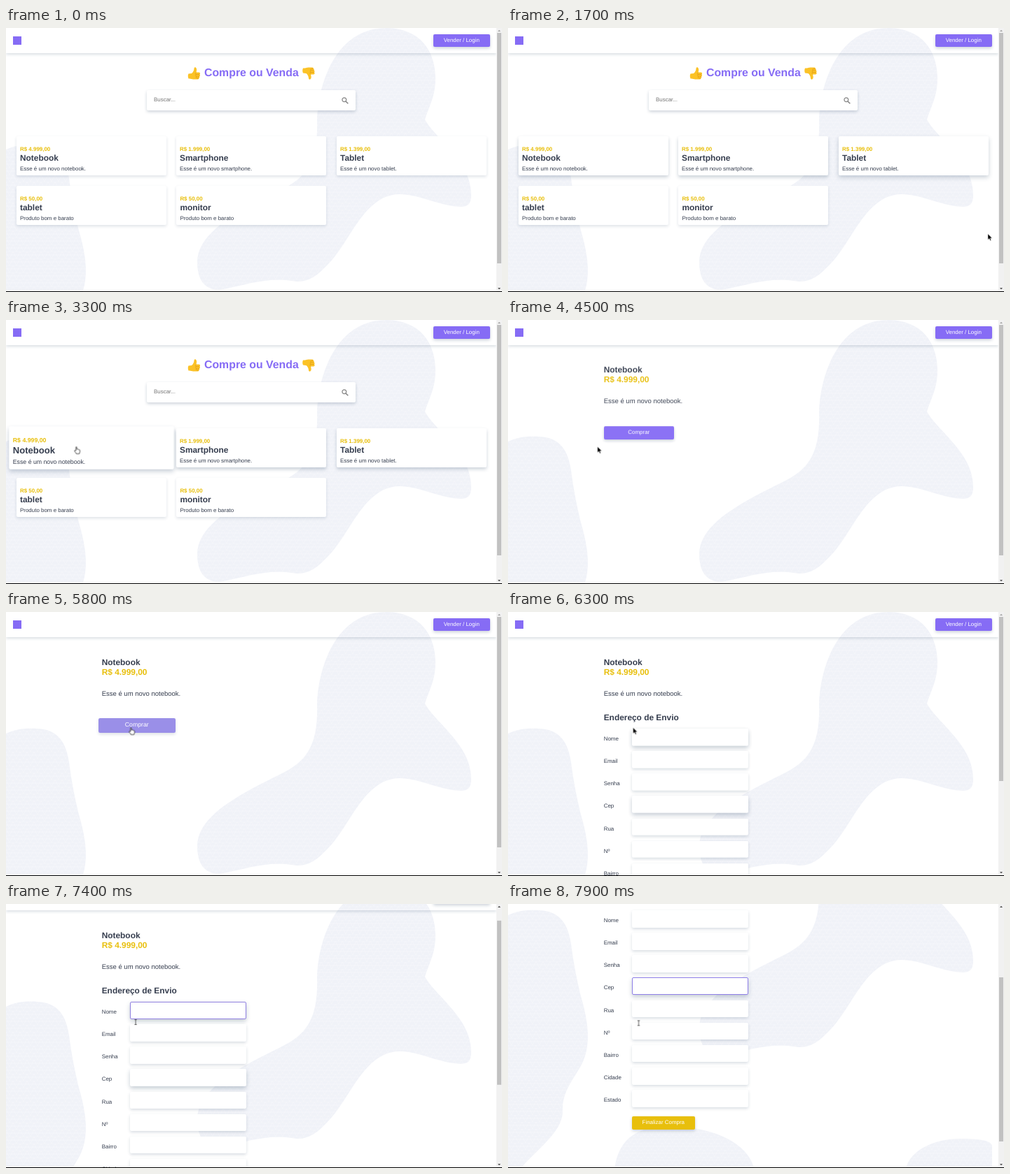
Write an HTML page that moves like this. It is 708x378 px and loops after 8 s.

```html
<!DOCTYPE html>
<html lang="pt-BR">
<head>
<meta charset="utf-8">
<title>Loja</title>
<style>
  :root { --purple: #866cf5; --gold: #e8bf0c; --ink: #353d4e; }
  html, body { margin: 0; width: 100%; height: 100%; overflow: hidden; background: #fff; }
  body { font: 7.95px/0 "Liberation Sans", Arial, sans-serif; color: var(--ink); text-rendering: geometricPrecision; }
  div, span, svg { position: absolute; }
  span { white-space: nowrap; }
  .a { animation-duration: 8s; animation-iteration-count: infinite; }
  #stage { width: 708px; height: 378px; overflow: hidden; background: #000; }
  #view { width: 708px; height: 377px; overflow: hidden; background: #fff; }
  #page { width: 700px; height: 600px; animation-name: scroll; }
  .layer { left: 0; top: 0; width: 700px; height: 600px; }

  #header { width: 700px; height: 36px; box-shadow: 0 2px 4px rgba(30,60,90,.16); }
  #logo { left: 10px; top: 12px; width: 12px; height: 12px; background: var(--purple); }
  .btn { border-radius: 2px; background: var(--purple); color: #fff; text-align: center; box-shadow: 0 2px 4px rgba(30,60,90,.22); }
  .btn span { left: 0; right: 0; }
  .big { font-size: 11.9px; font-weight: bold; }
  .price { font-weight: bold; color: var(--gold); }

  #title { left: 283px; top: 65px; font-size: 15.85px; font-weight: bold; color: var(--purple); }
  #search { left: 201px; top: 89px; width: 298px; height: 28.5px; border-radius: 2px; background: #fff; box-shadow: 0 2px 4px rgba(30,60,90,.22); }
  .card { width: 214px; height: 56px; border-radius: 2px; background: #fff; box-shadow: 0 2px 4px rgba(30,60,90,.14); }
  .card span { left: 5px; }

  #home { animation-name: leave; }
  #product { animation-name: enter; }
  #form { animation-name: form; }
  #buy { left: 136.5px; top: 153px; width: 99.5px; height: 18.5px; animation-name: buy; }
  #product > span, #form > span { left: 136.7px; }
  .field { left: 176.5px; width: 166.5px; height: 24.5px; border-radius: 2px; background: #fff; border: 1px solid transparent;
    box-sizing: border-box; box-shadow: 0 2px 4px rgba(30,60,90,.17); }
  #done { left: 176.5px; top: 462px; width: 90.5px; height: 18.5px; background: var(--gold); }

  #bar { left: 700px; width: 8px; height: 377px; background: #f1f1f1; }
  #thumb { left: 1.3px; top: 7px; width: 5.7px; height: 330px; background: #c1c1c1; animation-name: size, tint, slide; }
  #up { animation-name: up; animation-timing-function: step-end; }
  #cursor { left: 0; top: 0; animation-name: path; animation-timing-function: linear; }
  #cursor svg { left: -10px; top: -10px; animation-timing-function: step-end; }
  #arrow { animation-name: arrow; }
  #hand { animation-name: hand; }
  #beam { animation-name: beam; }

  @keyframes leave { 0%, 50% { opacity: 1; transform: none; } 53.5%, 100% { opacity: 0; transform: translateY(20px); } }
  @keyframes enter { 0%, 53.5% { opacity: 0; transform: translateY(-20px); } 57.25%, 100% { opacity: 1; transform: none; } }
  @keyframes form { 0%, 75.44% { opacity: 0; transform: translateY(-20px); } 79.19%, 100% { opacity: 1; transform: none; } }
  @keyframes buy {
    0%, 60.75% { background: var(--purple); transform: none; opacity: 1; }
    64%, 71.69% { background: #6655dd; transform: scale(1.1); opacity: 1; }
    75.44%, 100% { background: #6655dd; transform: scale(1.1); opacity: 0; }
  }
  @keyframes hover0 {
    0%, 35% { transform: none; }
    38.75%, 100% { transform: scale(1.1); box-shadow: 0 3px 6px rgba(30,60,90,.24); }
  }
  @keyframes hover1 {
    0%, 31.1% { transform: none; }
    34.75%, 35% { transform: scale(1.1); box-shadow: 0 3px 6px rgba(30,60,90,.24); }
    38.75%, 100% { transform: none; }
  }
  @keyframes hover2 {
    0%, 26.5% { transform: none; }
    30.25%, 31.1% { transform: scale(1.1); box-shadow: 0 3px 6px rgba(30,60,90,.24); }
    34.9%, 100% { transform: none; }
  }
  @keyframes focus0 {
    0%, 84.6% { border-color: transparent; }
    88.3%, 95% { border-color: #8f7fe0; box-shadow: 0 3px 6px rgba(30,60,90,.26); }
    98.5%, 100% { border-color: transparent; }
  }
  @keyframes focus3 {
    0%, 95% { border-color: transparent; }
    98.5%, 100% { border-color: #8f7fe8; box-shadow: 0 3px 6px rgba(30,60,90,.26); }
  }
  @keyframes scroll {
    0%, 90% { transform: none; animation-timing-function: ease-in-out; }
    98.75%, 100% { transform: translateY(-158px); }
  }
  @keyframes slide {
    0%, 90% { transform: none; animation-timing-function: ease-in-out; }
    98.75%, 100% { transform: translateY(98px); }
  }
  @keyframes size { 0%, 75.44% { height: 330px; } 75.45%, 100% { height: 235px; } }
  @keyframes tint {
    0%, 8.69% { background: #c1c1c1; }
    8.7%, 11.1% { background: #a8a8a8; }
    11.2%, 100% { background: #c1c1c1; }
  }
  @keyframes up { 0% { fill: #a3a3a3; } 90.2%, 100% { fill: #505050; } }
  @keyframes path {
    0%, 8.7% { transform: translate(704px, 310px); }
    11.2%, 20.6% { transform: translate(689px, 294px); }
    21.2% { transform: translate(685.5px, 295.5px); }
    25% { transform: translate(648px, 245px); }
    27.5% { transform: translate(600px, 195px); }
    31.25% { transform: translate(452px, 188px); }
    35% { transform: translate(230px, 187px); }
    41.2%, 42.75% { transform: translate(100.5px, 181.5px); }
    46.25%, 51% { transform: translate(110px, 189.5px); }
    56.2% { transform: translate(127px, 181.5px); }
    61%, 83.5% { transform: translate(178.5px, 165.5px); }
    85%, 90% { transform: translate(184.5px, 168.5px); }
    98.75%, 100% { transform: translate(186.5px, 170.5px); }
  }
  @keyframes arrow { 0% { opacity: 0; } 8.7% { opacity: 1; } 26.5% { opacity: 0; } 53.5% { opacity: 1; } 60.7% { opacity: 0; } 75.4% { opacity: 1; } 84.6%, 100% { opacity: 0; } }
  @keyframes hand { 0% { opacity: 0; } 26.5% { opacity: 1; } 53.5% { opacity: 0; } 60.7% { opacity: 1; } 75.4%, 100% { opacity: 0; } }
  @keyframes beam { 0% { opacity: 0; } 84.6%, 100% { opacity: 1; } }
</style>
</head>
<body>
<div id="stage">
  <div id="view">
    <div id="page" class="a">
      <svg width="700" height="600">
        <defs>
          <pattern id="mesh" width="10" height="10" patternUnits="userSpaceOnUse">
            <rect width="10" height="10" fill="#f0f2f8"/>
            <path d="M0 0L5 10L10 0M0 0H10M0 5H10" fill="none" stroke="#fff" stroke-width=".6" opacity=".4"/>
          </pattern>
        </defs>
        <g fill="url(#mesh)">
          <path d="M543 0C590 0 613 32 613 72C613 98 604 112 598 131C612 158 664 190 664 238C664 252 660 256 648 256C615 254 590 238 562 238C510 238 490 310 458 340C445 354 432 364 415 363C370 356 345 368 310 374C285 378 273 362 273 335C273 290 340 258 392 232C430 214 446 190 444 130C446 80 470 0 543 0Z"/>
          <path d="M0 174C15 167 30 166 45 167C75 168 86 188 90 215C94 245 98 265 104 290C110 310 114 330 114 347C114 370 108 385 98 400C85 420 77 435 78 455C78 485 40 510 15 540H0Z"/>
          <path d="M152 540C155 500 180 478 220 477C290 474 345 500 352 540Z"/>
          <path d="M567 540C572 510 610 494 645 494C670 494 691 496 691 505V540Z"/>
        </g>
      </svg>

      <div id="header">
        <div id="logo"></div>
        <div class="btn" style="left:610px;top:8.5px;width:80.5px;height:18.5px"><span style="top:9.2px">Vender / Login</span></div>
      </div>

      <div id="home" class="layer a">
        <svg width="700" height="130">
          <defs>
            <g id="like">
              <path d="M1 9.5L5.5 9C7.5 7.5 8.8 5 9 2C9.2 .3 10.5 0 11.5 .7C13.2 2 12.8 5 12 7.6H16C18 7.7 18 10 16.8 10.4C18 11 17.8 12.8 16.5 13.2C17.3 14 16.9 15.3 15.8 15.6C16.2 16.6 15.6 17.6 14.2 17.6H9C6.5 17.6 5.5 16.5 1 16.4C0 14 0 11.5 1 9.5Z" fill="#fbc227"/>
              <path d="M12 7.6C10.8 8.6 10.8 10 11.5 10.4H16.8M11.6 10.4C11 12 11.4 13 12 13.2H16.5M12 13.2C11.6 14.5 11.8 15.4 12.6 15.6H15.8" fill="none" stroke="#e09a10" stroke-width=".7"/>
            </g>
          </defs>
          <use href="#like" x="259.5" y="56"/>
          <use href="#like" transform="translate(423 74) scale(1 -1)"/>
        </svg>
        <span id="title">Compre ou Venda</span>
        <div id="search">
          <span style="left:10px;top:14px;color:#757575">Buscar...</span>
          <svg width="12" height="12" style="left:277px;top:9px" fill="none" stroke="#858585">
            <circle cx="4.8" cy="4.8" r="2.9" stroke-width="1.2"/>
            <path d="M7 7L10.3 10.3" stroke-width="1.6"/>
          </svg>
        </div>
      </div>

      <div id="product" class="layer a">
        <span class="big" style="top:72.2px">Notebook</span>
        <span class="big price" style="top:86.2px">R$ 4.999,00</span>
        <span style="top:118.3px;font-size:9.5px">Esse é um novo notebook.</span>
        <div id="buy" class="btn a"><span style="top:9.2px">Comprar</span></div>
        <div id="form" class="layer a">
          <span class="big" style="top:150.5px">Endereço de Envio</span>
          <div id="done" class="btn"><span style="top:9.2px">Finalizar Compra</span></div>
        </div>
      </div>
    </div>

    <div id="bar">
      <div id="thumb" class="a"></div>
      <svg width="8" height="377" fill="#505050">
        <path id="up" class="a" d="M2 5L4 2.8L6 5Z"/>
        <path d="M2 372L4 374.2L6 372Z"/>
      </svg>
    </div>
  </div>

  <div id="cursor" class="a">
    <svg id="arrow" class="a" width="24" height="24" viewBox="-10 -10 24 24">
      <path d="M0 0V8.6L2 6.8L3.4 9.8L4.8 9.2L3.5 6.3H6.2Z" fill="#000" stroke="#fff" stroke-width=".5"/>
    </svg>
    <svg id="hand" class="a" width="24" height="24" viewBox="-10 -10 24 24">
      <path d="M-.8 5.8V.8C-.8 -.2 .7 -.2 .7 .8V3.6C1.2 3 2 3.2 2.2 3.9C2.7 3.4 3.5 3.6 3.7 4.3C4.3 4 5 4.4 5 5.2V7.2C5 8.6 4.3 9 4.2 10H-.2C-.5 8.6 -2 7.6 -2.7 6.2C-3 5.3 -2.1 4.9 -1.5 5.3Z" fill="#fff" stroke="#222" stroke-width=".8"/>
    </svg>
    <svg id="beam" class="a" width="24" height="24" viewBox="-10 -10 24 24">
      <path d="M-1.6 -3.5H1.6M0 -3.5V3.5M-1.6 3.5H1.6" fill="none" stroke="#333" stroke-width=".8"/>
    </svg>
  </div>
</div>
<script>
  const add = (id, html) => document.getElementById(id).insertAdjacentHTML("beforeend", html);

  const cards = [
    ["4.999,00", "Notebook", "Esse é um novo notebook."],
    ["1.999,00", "Smartphone", "Esse é um novo smartphone."],
    ["1.399,00", "Tablet", "Esse é um novo tablet."],
    ["50,00", "tablet", "Produto bom e barato"],
    ["50,00", "monitor", "Produto bom e barato"]
  ];
  cards.forEach(([price, name, text], i) => {
    const x = 15 + (i % 3) * 228.4, y = 155 + Math.floor(i / 3) * 71.4;
    add("home", `<div class="card a" style="left:${x}px;top:${y}px;animation-name:hover${i}">
      <span class="price" style="top:19px">R$ ${price}</span>
      <span class="big" style="top:30.7px">${name}</span>
      <span style="top:46.7px">${text}</span></div>`);
  });

  const labels = ["Nome", "Email", "Senha", "Cep", "Rua", "Nº", "Bairro", "Cidade", "Estado"];
  labels.forEach((label, i) => {
    const y = 167 + i * 32.15;
    add("form", `<span style="top:${y + 15}px">${label}</span>
      <div class="field a" style="top:${y}px;animation-name:focus${i}"></div>`);
  });
</script>
</body>
</html>
```
